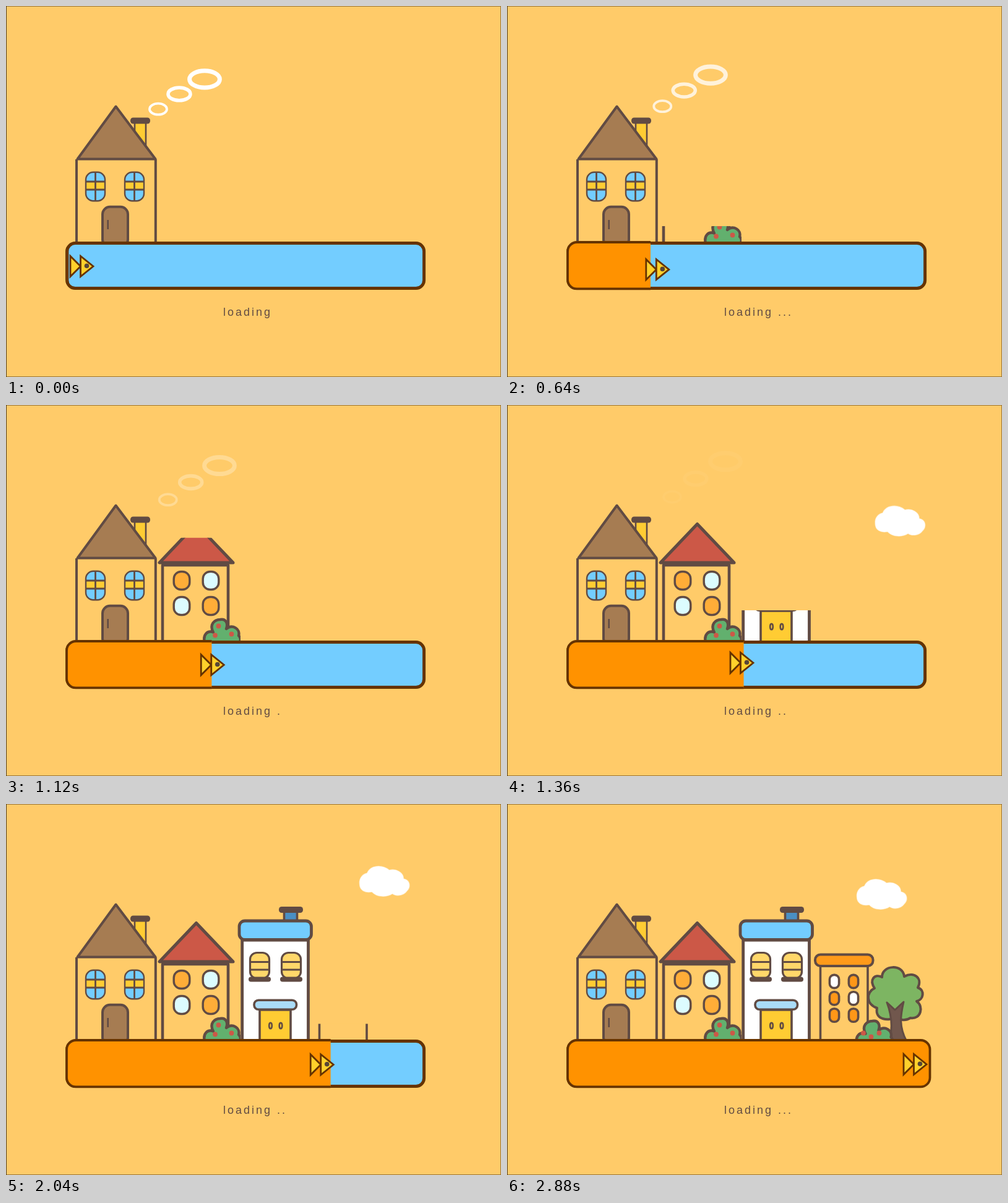
Animation, 800 px wide and 600 px high, one loop 3880 ms. Source, as an HTML page with a canvas:

```html
<!DOCTYPE html>
<html lang="en">
<head>
<meta charset="utf-8">
<title>Loading</title>
<style>
  html, body { margin: 0; width: 100%; height: 100%; overflow: hidden; background: #ffcb69; }
  canvas { display: block; width: 800px; height: 600px; }
</style>
</head>
<body>
<canvas id="stage" width="800" height="600"></canvas>
<script>
const ctx = document.getElementById('stage').getContext('2d');
const LOOP = 3880, STEP = 40, LAST = 2880, GROUND = 382;
const BG = '#ffcb69', LINE = '#614b43', RIM = '#663300', BLUE = '#73cdff',
      YELLOW = '#ffcc33', BROWN = '#a67c52', RED = '#cc5847', PALE = '#dcfcff', AMBER = '#ffad38';

function paint(path, fill, width, color = LINE, join = 'round') {
  if (fill) { ctx.fillStyle = fill; ctx.fill(path); }
  if (width) {
    ctx.lineWidth = width;
    ctx.strokeStyle = color;
    ctx.lineJoin = join;
    ctx.stroke(path);
  }
}
const shape = (d, fill, width, color, join) => paint(new Path2D(d), fill, width, color, join);

// Rounded box given by its stroke centre line.
function box(x1, y1, x2, y2, r, fill, width, color) {
  const p = new Path2D();
  p.roundRect(x1, y1, x2 - x1, y2 - y1, r);
  paint(p, fill, width, color);
}
function oval(x, y, rx, ry, fill, width, color) {
  const p = new Path2D();
  p.ellipse(x, y, rx, ry, 0, 0, Math.PI * 2);
  paint(p, fill, width, color);
}
function at(x, y, draw) {
  ctx.save();
  ctx.translate(x, y);
  draw();
  ctx.restore();
}
function clipped(x, y, w, h, draw) {
  ctx.save();
  ctx.beginPath();
  ctx.rect(x, y, w, h);
  ctx.clip();
  draw();
  ctx.restore();
}
// Uncovers a building from the ground upwards.
function rise(t, start, draw, right = 800) {
  const h = (t - start) * 0.2945;
  if (h > 0) clipped(0, GROUND - h, right, h + 3, draw);
}
// Linear path through [time, x, y] points.
function along(keys, t) {
  let i = 1;
  while (i < keys.length - 1 && t > keys[i][0]) i++;
  const [t0, x0, y0] = keys[i - 1], [t1, x1, y1] = keys[i];
  const u = (t - t0) / (t1 - t0);
  return [x0 + (x1 - x0) * u, y0 + (y1 - y0) * u];
}

function brownHouse() {
  shape('M208 188V230H226V188', YELLOW, 2.6);
  box(201, 180.5, 233, 190.5, 4.5, LINE);
  shape('M114 248V384M241.8 248V384', null, 4);
  shape('M177.5 162.5L115.5 247.5H241.5Z', BROWN, 4);
  for (const x of [144.5, 207.5]) at(x, 292, () => {
    box(-15.5, -23.2, 15.5, 23.2, 12, BLUE);
    ctx.fillStyle = YELLOW;
    ctx.fillRect(-15.5, -8, 31, 13);
    shape('M-16 -8H16M-16 5H16M0 -23V23', null, 2.8);
    box(-15.5, -23.2, 15.5, 23.2, 12, null, 2.4);
  });
  box(156, 324.8, 197, 390, 12, BROWN, 4);
  shape('M164.7 346V361', null, 2.6);
}

function redHouse() {
  shape('M253 384V259H359V384', BG, 4.6);
  shape('M307.5 192.5L248 255H367Z', RED, 5);
  for (const [x, y, fill] of [[284, 284, AMBER], [331, 284, PALE], [284, 325, PALE], [331, 325, AMBER]])
    box(x - 12.8, y - 14.5, x + 12.8, y + 14.5, 11.5, fill, 3.4);
}

function whiteHouse() {
  shape('M381.7 384V220H488.5V384', '#fff', 4.8);
  box(449.5, 172, 470.5, 190, 0, '#4a8fc4', 3.6);
  box(441, 166, 480, 176, 4.5, LINE);
  box(377, 189, 493.5, 219.5, 9, BLUE, 4.8);
  for (const x of [410, 461]) at(x, 0, () => {
    box(-15.5, 240.5, 15.5, 282, 11, '#ffd76a', 3.2);
    shape('M-15.5 255.5H15.5M-15.5 268H15.5', null, 3);
    box(-18, 279.5, 18, 287.5, 4, LINE);
  });
  box(410, 333, 460, 390, 0, YELLOW, 3.6);
  box(401, 317.3, 469.5, 332.3, 7, '#aadcf8', 3.6);
  for (const x of [427.5, 444]) oval(x, 358.5, 2.3, 4.7, null, 2.6);
}

function orangeHouse() {
  shape('M506.5 384V262H583V384', BG, 3.6);
  box(498, 243.5, 591.5, 262, 8.5, '#ff9a1a', 4);
  ['#fff', '#ff9718', '#ff9718', '#fff', '#ff9718', '#ff9718'].forEach((fill, i) => {
    const x = i % 2 ? 560 : 529, y = 287 + 27.3 * (i >> 1);
    box(x - 7.6, y - 10.6, x + 7.6, y + 10.6, 7, fill, 3.6);
  });
}

function bush(x, y, berries) {
  at(x, y, () => {
    shape('M1 40C-2 28 5 20 15 23.500C8 11 17 3 26 3C36 1 39 10 36 18C46 10 59 18 56 29C60 33 59 38 57 41', '#62b06e', 4.4);
    for (const [bx, by] of berries) oval(bx, by, 3.9, 3.9, RED);
  });
}

function tree() {
  shape('M628 345C618 351 594 350 598 330C580 324 580 304 594 298C585 284 594 274 606 280' +
        'C606 260 640 258 642 279C658 270 672 282 664 297C676 301 673 317 662 319' +
        'C674 327 669 349 652 346C644 351 636 350 628 345Z', '#7db562', 4);
  shape('M614 321L627 333L641 320C636 342 633 360 646 384H618C623 365 623 345 614 321Z', '#71574d', 3);
}

function smoke(t) {
  const life = Math.min(1, Math.max(0, (t - 400) / 1000));
  ctx.globalAlpha = 1 - life;
  const rings = [
    [246, 166.7, 14, 9, 3.8, 21.9, -18.8],
    [280, 142.4, 18, 10.4, 5.6, 26, -24.2],
    [321, 118.4, 24.4, 13.6, 7, 33.3, -28.3]
  ];
  for (const [x, y, rx, ry, w, dx, dy] of rings)
    oval(x + dx * life, y + dy * life, rx, ry, null, w, '#fff');
  ctx.globalAlpha = 1;
}

function cloud(t) {
  if (t < 1160) return;
  let x = 605.5, y = 146;
  if (t < 1840) {
    const left = ((1840 - t) / 680) ** 2;
    x = 617.5 + 35.5 * left;
    y = 104 + 168 * left;
  } else if (t < 2240) {
    const u = (t - 1840) / 400, e = u * u * (3 - 2 * u);
    x = 617.5 - 12 * e;
    y = 104 + 42 * e;
  }
  at(x, y, () => shape('M-40 4C-41 -6 -34 -12 -28 -13C-23 -26 -4 -28 8 -18C19 -21 31 -14 31 -4' +
    'C42 -2 43 10 36 16C30 24 18 24 13 20C4 26 -12 26 -20 17C-32 19 -40 14 -40 4Z',
    '#fff', 1.5, 'rgba(255,255,255,.5)'));
}

function bar(t) {
  box(98.8, 383.6, 675.6, 456.6, 13, BLUE, 5, RIM);
  clipped(90, 375, 8.3 + 0.209 * t, 90, () => box(98, 382, 683.5, 457.4, 15, '#ff9200', 3.8, RIM));
}

const swim = [
  [0, 143.5, 421], [400, 219.5, 427], [480, 234.5, 428], [880, 309, 423.5], [1360, 400.5, 417],
  [1720, 462, 411.5], [2360, 601.5, 431.5], [2880, 680.5, 421]
];
function fish(t) {
  const [x, y] = along(swim, t);
  at(x, y, () => {
    shape('M-39.500 -16.500V16.500L-23 0Z', '#ffd12b', 2.8, RIM, 'miter');
    shape('M-23 -16.500V16.500L-2.500 0Z', '#ffd12b', 2.8, RIM, 'miter');
    oval(-13, -0.8, 3.8, 3.8, '#574638');
  });
}

function caption(frame) {
  const n = Math.floor((frame - 3.9) / 6.05);
  const dots = n < 0 ? '' : ' ' + '.'.repeat(n % 3 + 1);
  ctx.font = '18px "Liberation Sans", Arial, sans-serif';
  ctx.letterSpacing = '3px';
  ctx.fillStyle = LINE;
  ctx.fillText('loading' + dots, 351, 501);
}

function edges() {
  ctx.fillStyle = 'rgba(50,38,20,.85)';
  ctx.fillRect(0, 0, 1, 600);
  ctx.fillStyle = 'rgba(70,50,20,.55)';
  ctx.fillRect(1, 0, 799, 1);
  ctx.fillRect(799, 1, 1, 599);
  ctx.fillRect(1, 599, 798, 1);
}

function draw(t) {
  ctx.fillStyle = BG;
  ctx.fillRect(0, 0, 800, 600);
  edges();
  smoke(t);
  cloud(t);
  brownHouse();
  rise(t, 552, () => {
    redHouse();
    bush(320, 344, [[23.5, 13.5], [18, 28.5], [44.5, 26.5]]);
  }, 379);
  rise(t, 1190, whiteHouse);
  rise(t, 1950, orangeHouse);
  rise(t, 2380, () => {
    tree();
    bush(564.5, 348, [[11.5, 22.5], [37, 22.5], [24, 28.5]]);
  });
  bar(t);
  fish(t);
  caption(t / STEP);
}

const began = performance.now();
function tick() {
  const t = (performance.now() - began) % LOOP;
  draw(Math.min(LAST, Math.floor(t / STEP) * STEP));
  requestAnimationFrame(tick);
}
tick();
</script>
</body>
</html>
```
